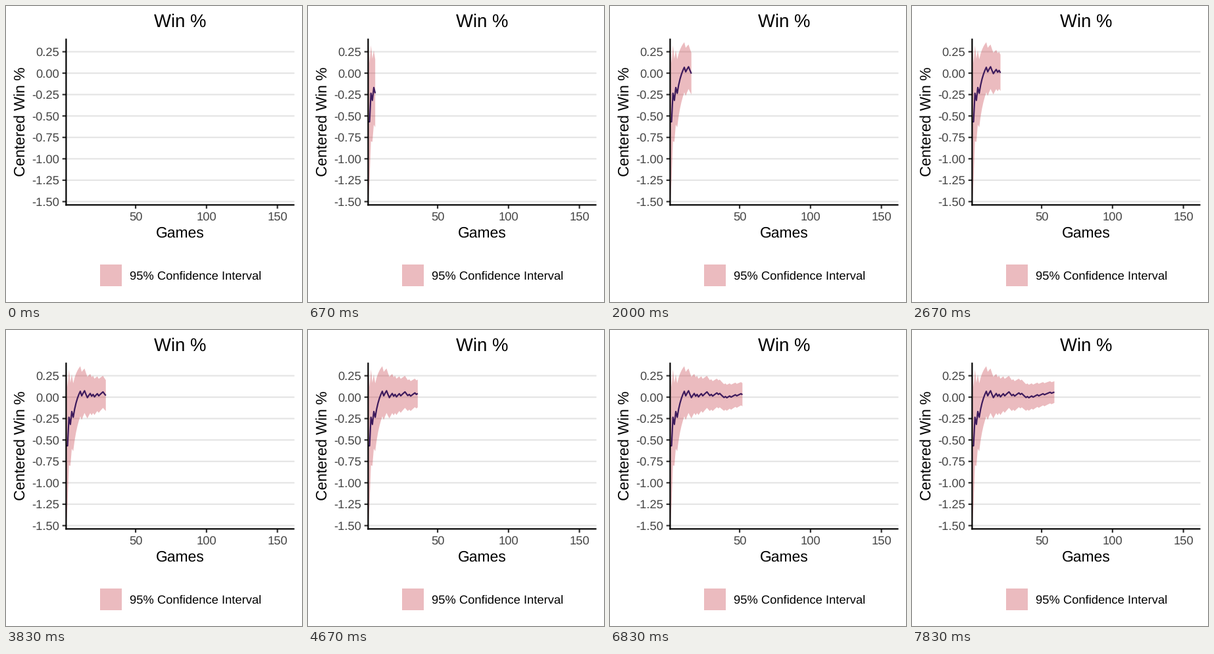
Recreate the animation shown at these times as a matplotlib script. Size 450 px wide and 450 px high, loop 8 s.

```python
import math

import numpy as np
import matplotlib.pyplot as plt
from matplotlib.animation import FuncAnimation
from matplotlib.patches import Polygon, Rectangle

plt.rcParams["font.family"] = "Liberation Sans"
plt.rcParams["text.hinting"] = "no_hinting"
plt.rcParams["path.snap"] = False

SIZE, DPI = 450, 100
FRAMES, TICK_MS = 200, 40
LEFT, RIGHT, TOP, BOTTOM = 91.4, 438.5, 49.6, 302.4
BASE = 22.92  # font size in pixels
SMALL, LARGE = 0.8 * BASE, 1.2 * BASE
SEASON_RATE = 92 / 162
RIBBON = dict(facecolor="#c0202c", alpha=0.3, linewidth=0)
RESULTS = "LLWLWLWWWWWLWWLLWWLWLWWLWWWLLWLWWWLWLLLWLWWLWWWLWWWLWWWWLWW"


def px(n):
    """Pixels to points."""
    return n * 72 / DPI


def game_x(game):
    return LEFT + (RIGHT - LEFT) * (game - 1) / 161


def value_y(value):
    return 102.1 - 130.2 * value


fig = plt.figure(figsize=(SIZE / DPI, SIZE / DPI), dpi=DPI, facecolor="white")
ax = fig.add_axes([0, 0, 1, 1])
ax.set(xlim=(0, SIZE), ylim=(SIZE, 0))
ax.axis("off")


def segment(x0, y0, x1, y1, color, z):
    ax.plot([x0, x1], [y0, y1], color=color, lw=px(2.2), zorder=z,
            solid_capstyle="butt")


def label(x, y, text, size, color="black", ha="center", rotation=0):
    ax.text(x, y, text, fontsize=px(size), color=color, ha=ha, va="baseline",
            rotation=rotation, rotation_mode="anchor")


# Running win rate with its interval, centred on the season's rate
games = np.arange(1, len(RESULTS) + 1)
wins = np.cumsum([r == "W" for r in RESULTS])
centered = wins / games - SEASON_RATE
margin = 1.96 * np.sqrt(SEASON_RATE * (1 - SEASON_RATE) / games)
xs = game_x(games)
mid = value_y(centered)
upper = value_y(centered + margin)
lower = value_y(centered - margin)

# Axes and labels
for value in np.arange(0.25, -1.51, -0.25):
    y = value_y(value)
    segment(LEFT, y, RIGHT, y, "#e5e5e5", 1)
    segment(LEFT - 5.7, y, LEFT, y, "#333333", 4)
    label(80.9, y + 6.3, f"{value:.2f}", SMALL, "#444444", "right")
for game in (50, 100, 150):
    x = game_x(game)
    segment(x, BOTTOM, x, BOTTOM + 5.7, "#333333", 4)
    label(x, 326, str(game), SMALL, "#444444")
segment(LEFT, TOP, LEFT, BOTTOM + 1.1, "black", 5)
segment(LEFT - 1.1, BOTTOM, RIGHT, BOTTOM, "black", 5)

label(264.7, 32, "Win %", LARGE)
label(264.7, 352, "Games", BASE)
label(28.7, 176.2, "Centered Win %", BASE, rotation=90)

ax.add_patch(Rectangle((143, 393), 33, 33, **RIBBON))
label(188.5, 416, "95% Confidence Interval", SMALL, ha="left")

# Moving parts
panel = Rectangle((LEFT, TOP), RIGHT - LEFT, BOTTOM - TOP,
                  transform=ax.transData)
band = ax.add_patch(Polygon([(LEFT, TOP)] * 3, zorder=2, **RIBBON))
line, = ax.plot([], [], color="#3d1a5c", lw=px(2.2), zorder=3,
                solid_capstyle="butt", solid_joinstyle="round")
for part in (band, line):
    part.set_clip_path(panel)


def draw(frame):
    # The chart advances six times a second, 1.24 games a step
    step = math.floor((frame * TICK_MS + 35) * 6 / 1000)
    n = math.floor(1.4 + 1.24 * step)
    shown = n > 1
    band.set_visible(shown)
    line.set_visible(shown)
    top = np.column_stack([xs[:n], upper[:n]])
    base = np.column_stack([xs[:n], lower[:n]])
    band.set_xy(np.vstack([top, base[::-1]]))
    line.set_data(xs[:n], mid[:n])
    return band, line


anim = FuncAnimation(fig, draw, frames=FRAMES, interval=TICK_MS,
                     init_func=lambda: draw(0), repeat=True, repeat_delay=0)
plt.show()
```
